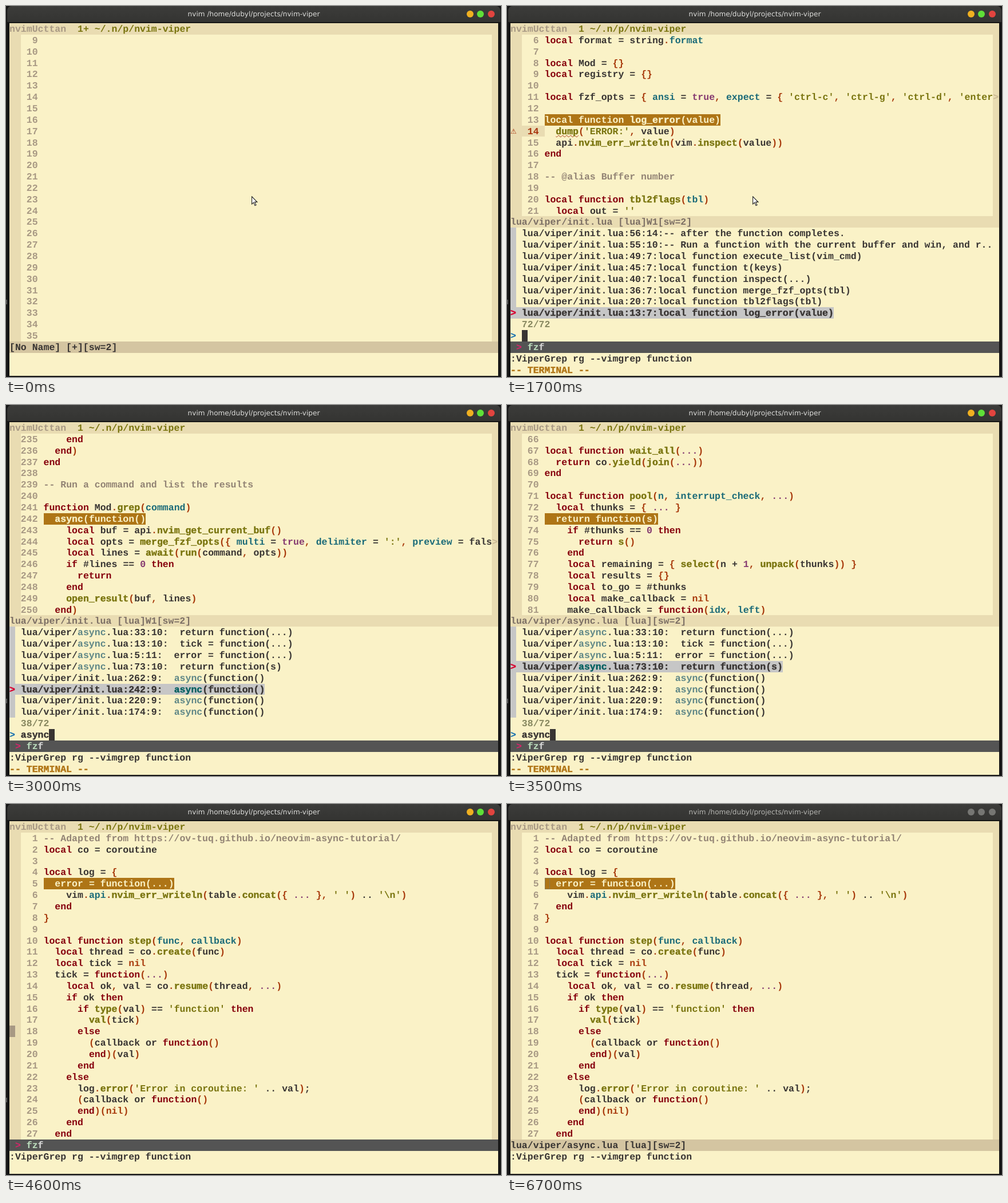
These frames come from a looping animation (865 by 648 pixels, 6.8 s). An HTML page:

```html
<!DOCTYPE html>
<html lang="en">
<head>
<meta charset="utf-8">
<title>Terminal</title>
<style>
  html, body { margin: 0; width: 100%; height: 100%; overflow: hidden; background: #151515; }
  #stage { position: relative; width: 865px; height: 648px; overflow: hidden; }
  #bar { position: absolute; left: 2px; top: 0; width: 862px; height: 28px; border-radius: 8px 8px 0 0;
    background: linear-gradient(#3c3c3a, #343432); color: #dcdcda; text-align: center;
    font: 12.1px/28px "DejaVu Sans", sans-serif; text-rendering: geometricPrecision; }
  #bar i { position: absolute; top: 8px; width: 12px; height: 12px; border-radius: 50%; }
  .blur #bar { color: #b4b4b0; }
  .blur #bar i { background: #767673 !important; }
  #tick { position: absolute; left: 0; top: 513px; width: 2px; height: 8px; background: #555; }
  .blur #tick { display: none; }
  #screen { position: absolute; left: 6px; top: 30px; width: 854px; height: 615.5px; overflow: hidden;
    background: #faf2c7; font: bold 16.53px/21.85px "Liberation Mono", monospace;
    text-rendering: geometricPrecision; font-variant-ligatures: none; }
  #screen span { position: absolute; height: 19.85px; white-space: pre; }
  #screen .heavy { -webkit-text-stroke: .4px currentColor; }
  #screen .wavy { text-decoration: underline wavy 1px; text-underline-offset: 1px; text-decoration-skip-ink: none; }
  #screen .icon { font: 12px/21.85px "DejaVu Sans", sans-serif; }
  #screen .hollow { box-sizing: border-box; border: 1px solid #8c7a50; }
  #mouse { position: absolute; left: 0; top: 0; }
</style>
</head>
<body>
<div id="stage">
  <div id="bar">nvim /home/dubyl/projects/nvim-viper
    <i style="left:803px;background:#f0b021"></i>
    <i style="left:821px;background:#5fe038"></i>
    <i style="left:839.5px;background:#e2443f"></i>
  </div>
  <div id="tick"></div>
  <div id="screen"></div>
  <svg id="mouse" width="11" height="18"><path d="M.6.8V14L3.7 11.2 6 16.6 8 15.7 5.7 10.4H9.8Z" fill="#fff" stroke="#222" stroke-width="1.1"/></svg>
</div>
<script>
const CELL_W = 9.92, CELL_H = 19.85, LOOP = 6800, COLS = 86;
const C = {
  page: '#faf2c7', side: '#e9dcb2', status: '#d4c5a1', text: '#383432', dim: '#a89984', faded: '#7c6f64',
  key: '#86000c', func: '#79740e', str: '#79740e', field: '#1a6a78', punct: '#a83a0c', purple: '#853a70',
  comment: '#928374', hit: '#ae7516', grey: '#c6c6c6', cursor: '#a89984'
};

const sources = {
  none: {},
  init: {
    6: String.raw`local format = string.format

local Mod = {}
local registry = {}

local fzf_opts = { ansi = true, expect = { 'ctrl-c', 'ctrl-g', 'ctrl-d', 'enter' } }

local function log_error(value)
  dump('ERROR:', value)
  api.nvim_err_writeln(vim.inspect(value))
end

-- @alias Buffer number

local function tbl2flags(tbl)
  local out = ''
  for key, value in pairs(tbl) do
    if value == true then
      out = out .. ' --' .. key
    elseif type(value) == 'table' then
      local list = table.concat(value, ',')
      out = out .. ' ' .. format([[--%s=%s]], key, vim.inspect(list))
    elseif value == false then
    else
      out = out .. ' ' .. format([[--%s=%s]], key, vim.inspect(value))
    end
  end
  return out
end

local function merge_fzf_opts(tbl)
  return tbl2flags(vim.tbl_deep_extend('keep', fzf_opts, { color = vim.o.background }))
end

local function inspect(...)
  print(unpack(vim.tbl_map(vim.inspect, { ... })))
end

-- Replace termcodes`,
    235: String.raw`    end
  end)
end

-- Run a command and list the results

function Mod.grep(command)
  async(function()
    local buf = api.nvim_get_current_buf()
    local opts = merge_fzf_opts({ multi = true, delimiter = ':', preview = false, nth = 4 })
    local lines = await(run(command, opts))
    if #lines == 0 then
      return
    end
    open_result(buf, lines)
  end)`,
    255: String.raw`  end)
end

-- List the open buffers

function Mod.buffers()

  async(function()
    local buffers = vim.tbl_filter(is_listed, api.nvim_list_bufs())
    local opts = merge_fzf_opts({ multi = true, prompt = 'Buffers> ', nth = 2 })
    local lines = await(run(buffers, opts))
    if #lines == 0 then
      return
    end
    open_result(lines)
  end)`
  },
  async: {
    1: String.raw`-- Adapted from https://ov-tuq.github.io/neovim-async-tutorial/
local co = coroutine

local log = {
  error = function(...)
    vim.api.nvim_err_writeln(table.concat({ ... }, ' ') .. '\n')
  end
}

local function step(func, callback)
  local thread = co.create(func)
  local tick = nil
  tick = function(...)
    local ok, val = co.resume(thread, ...)
    if ok then
      if type(val) == 'function' then
        val(tick)
      else
        (callback or function()
        end)(val)
      end
    else
      log.error('Error in coroutine: ' .. val);
      (callback or function()
      end)(nil)
    end
  end`,
    66: String.raw`
local function wait_all(...)
  return co.yield(join(...))
end

local function pool(n, interrupt_check, ...)
  local thunks = { ... }
  return function(s)
    if #thunks == 0 then
      return s()
    end
    local remaining = { select(n + 1, unpack(thunks)) }
    local results = {}
    local to_go = #thunks
    local make_callback = nil
    make_callback = function(idx, left)`
  }
};
const files = {};
for (const [name, parts] of Object.entries(sources)) {
  files[name] = {};
  for (const [first, code] of Object.entries(parts))
    code.split('\n').forEach((line, i) => files[name][+first + i] = line);
}

// Diagnostics in init.lua, by line
const marks = {
  14: { sign: '\u26a0\ufe0e', style: 'icon', color: '#a8330c', words: ['dump'] },
  40: { sign: '>>', color: C.field, words: ['function', 'inspect'] }
};
const noMark = { sign: '', color: C.dim, words: [] };

const allMatches = `56:14:-- after the function completes.
55:10:-- Run a function with the current buffer and win, and r..
49:7:local function execute_list(vim_cmd)
45:7:local function t(keys)
40:7:local function inspect(...)
36:7:local function merge_fzf_opts(tbl)
20:7:local function tbl2flags(tbl)
13:7:local function log_error(value)`.split('\n').map(s => 'lua/viper/init.lua:' + s);
const asyncMatches = [
  ...['33:10:  return function(...)', '13:10:  tick = function(...)', '5:11:  error = function(...)',
    '73:10:  return function(s)'].map(s => 'lua/viper/async.lua:' + s),
  ...[262, 242, 220, 174].map(n => `lua/viper/init.lua:${n}:9:  async(function()`)
];

const command = ':ViperGrep rg --vimgrep ';
const typed = s => ({ cmd: command + s, cursor: [29, command.length + s.length] });

// Each step changes part of the state before it
const steps = [
  [0, { file: 'none', hit: 16, cmd: '', mouse: [429, 332], focus: true }],
  [100, { cursor: [15, 6] }],
  [300, { keys: '<20>' }],
  [400, { keys: '', ...typed('') }],
  [700, typed('f')],
  [800, typed('fu')],
  [1100, typed('func')],
  [1200, typed('functi')],
  [1300, typed('functio')],
  [1500, typed('function')],
  [1600, { list: [], cursor: [18, 0] }],
  [1700, { file: 'init', hit: 13, list: allMatches, pick: 7, query: '', count: 72, cursor: null }],
  [2200, { hit: 20, pick: 6 }],
  [2500, { hit: 36, pick: 5 }],
  [2600, { query: 'a' }],
  [2700, { hit: 242, list: asyncMatches, query: 'asy', count: 39 }],
  [3000, { query: 'async', count: 38, mouse: null }],
  [3300, { hit: 262, pick: 4 }],
  [3500, { file: 'async', hit: 73, pick: 3 }],
  [3900, { hit: 5, pick: 2 }],
  [4600, { list: null, fzfBar: true, cursor: [18, 0] }],
  [5000, { fzfBar: false, cursor: null }],
  [5100, { cursor: [5, 6] }],
  [5600, { cursor: null }],
  [5800, { mouse: [429, 332] }],
  [5900, { mouse: [240, 172] }],
  [6000, { mouse: [64, 30], cursor: [5, 6] }],
  [6200, { mouse: [62, 16] }],
  [6300, { mouse: [60, 1] }],
  [6400, { mouse: null }],
  [6700, { focus: false }]
];
let merged = {};
const states = steps.map(([, change]) => merged = { ...merged, ...change });

const stage = document.getElementById('stage');
const screen = document.getElementById('screen');
const mouse = document.getElementById('mouse');

function cell(row, col) {
  const el = screen.appendChild(document.createElement('span'));
  el.style.left = col * CELL_W + 'px';
  el.style.top = row * CELL_H + 'px';
  return el;
}
function put(row, col, text, color = C.text, className = '') {
  const el = cell(row, col);
  el.textContent = text;
  el.style.color = color;
  el.className = className;
  return el;
}
function fill(row, col, cols, color, rows = 1) {
  const el = cell(row, col);
  el.style.width = cols * CELL_W + 'px';
  el.style.height = rows * CELL_H + 'px';
  el.style.background = color;
  return el;
}

const keywords = /^(local|function|if|then|else|elseif|end|return|for|in|do)$/;
const tokens = /--.*|'[^']*'?|\[\[.*?\]\]|\.\.\.?|[A-Za-z_]\w*|\d+|\s+|./g;

function tokenColor(word, before, after, isParam) {
  if (word.startsWith('--')) return C.comment;
  if (/^('|\[\[)/.test(word)) return C.str;
  if (word === '...' || word === 'true' || word === 'false' || /^\d/.test(word)) return C.purple;
  if (word === 'nil' || /^[.,(){}]$/.test(word)) return C.punct;
  if (keywords.test(word)) return C.key;
  if (!/^\w/.test(word)) return C.text;
  if (after[0] === '(') return C.func;
  if (isParam || before.endsWith('.') || (/[{,] $/.test(before) && /^ = /.test(after) && before.includes('{'))) return C.field;
  return C.text;
}

function drawCode(row, line, isHit, mark) {
  const shown = line.slice(0, 79);
  if (isHit) fill(row, 6, shown.length, C.hit);
  const params = line.match(/function\s*[\w.]*\([^)]*\)/);
  const from = params ? params.index + params[0].indexOf('(') : 0;
  const to = params ? params.index + params[0].length : 0;
  for (const m of shown.matchAll(tokens)) {
    const word = m[0], at = m.index;
    if (!word.trim()) continue;
    const after = line.slice(at + word.length);
    const color = tokenColor(word, line.slice(0, at), after, at > from && at < to);
    const el = put(row, 6 + at, word, isHit ? C.page : color);
    el.classList.toggle('heavy', color === C.func && after[0] === '(');
    if (mark.words.includes(word)) {
      el.classList.add('wavy');
      el.style.textDecorationColor = mark.color;
    }
  }
  if (line.length > 79) put(row, 85, '>', '#cbb994');
}

function drawEditor(s) {
  const rows = s.list ? 16 : 27, top = Math.max(1, s.hit - 7);
  fill(0, 0, COLS + 1, C.side);
  put(0, 0, 'nvimUcttan', C.dim);
  put(0, 12, (s.file === 'none' ? '1+' : '1') + ' ~/.n/p/nvim-viper', C.func);
  fill(1, 0, 2, C.side, rows);
  fill(1, 85, 2, C.side, rows);
  for (let row = 1; row <= rows; row++) {
    const n = top + row - 1;
    const mark = (s.file === 'init' && marks[n]) || noMark;
    if (mark.sign) {
      fill(row, 2, 4, C.side);
      put(row, 0, mark.sign, mark.color, mark.style);
    }
    put(row, 2, String(n).padStart(3), mark.color);
    drawCode(row, files[s.file][n] || '', s.file !== 'none' && n === s.hit, mark);
  }
  const row = rows + 1;
  fill(row, 0, COLS + 1, s.list ? C.side : C.status);
  const label = { none: '[No Name] [+]', init: 'lua/viper/init.lua [lua]W1', async: 'lua/viper/async.lua [lua]' }[s.file];
  if (!s.fzfBar) put(row, 0, label + '[sw=2]', s.list ? C.faded : C.text);
}

function drawFinder(s) {
  put(30, 0, '-- TERMINAL --', '#b07414', 'heavy');
  if (!s.list.length) return;
  fill(18, 0, 1, C.grey, 8);
  s.list.forEach((item, i) => {
    const row = 18 + i, picked = i === s.pick, weight = picked ? 'heavy' : '';
    if (picked) {
      fill(row, 0, 2 + item.length, C.grey);
      put(row, 0, '>', '#d7002f', weight);
    }
    const at = s.query.length > 1 ? item.indexOf(s.query) : -1;
    if (at < 0) return put(row, 2, item, C.text, weight);
    const end = at + s.query.length;
    put(row, 2, item.slice(0, at), C.text, weight);
    put(row, 2 + at, s.query, picked ? '#005f5f' : '#5f8787', weight);
    put(row, 2 + end, item.slice(end), C.text, weight);
  });
  put(26, 2, s.count + '/72', '#87875f');
  put(27, 0, '>', '#0a6aaf');
  put(27, 2, s.query, C.text, 'heavy');
  fill(27, 2 + s.query.length, 1, C.text);
}

function draw(s) {
  screen.replaceChildren();
  stage.className = s.focus ? '' : 'blur';
  drawEditor(s);
  if (s.list) drawFinder(s);
  if (s.list || s.fzfBar) {
    fill(28, 0, COLS + 1, '#545454');
    put(28, 1, '>', '#d8246a');
    put(28, 3, 'fz', '#bcddbd');
    put(28, 5, 'f', '#d9d9d9');
  }
  put(29, 0, s.cmd);
  if (s.keys) put(30, 75, s.keys);
  if (s.cursor) {
    const block = fill(...s.cursor, 1, s.focus ? C.cursor : 'none');
    if (!s.focus) block.className = 'hollow';
  }
  mouse.style.display = s.mouse ? '' : 'none';
  if (s.mouse) mouse.style.transform = `translate(${s.mouse[0]}px, ${s.mouse[1]}px)`;
}

let current = -1;
function tick() {
  const t = performance.now() % LOOP;
  const index = steps.findLastIndex(([start]) => start <= t);
  if (index !== current) draw(states[current = index]);
  requestAnimationFrame(tick);
}
tick();
</script>
</body>
</html>
```
